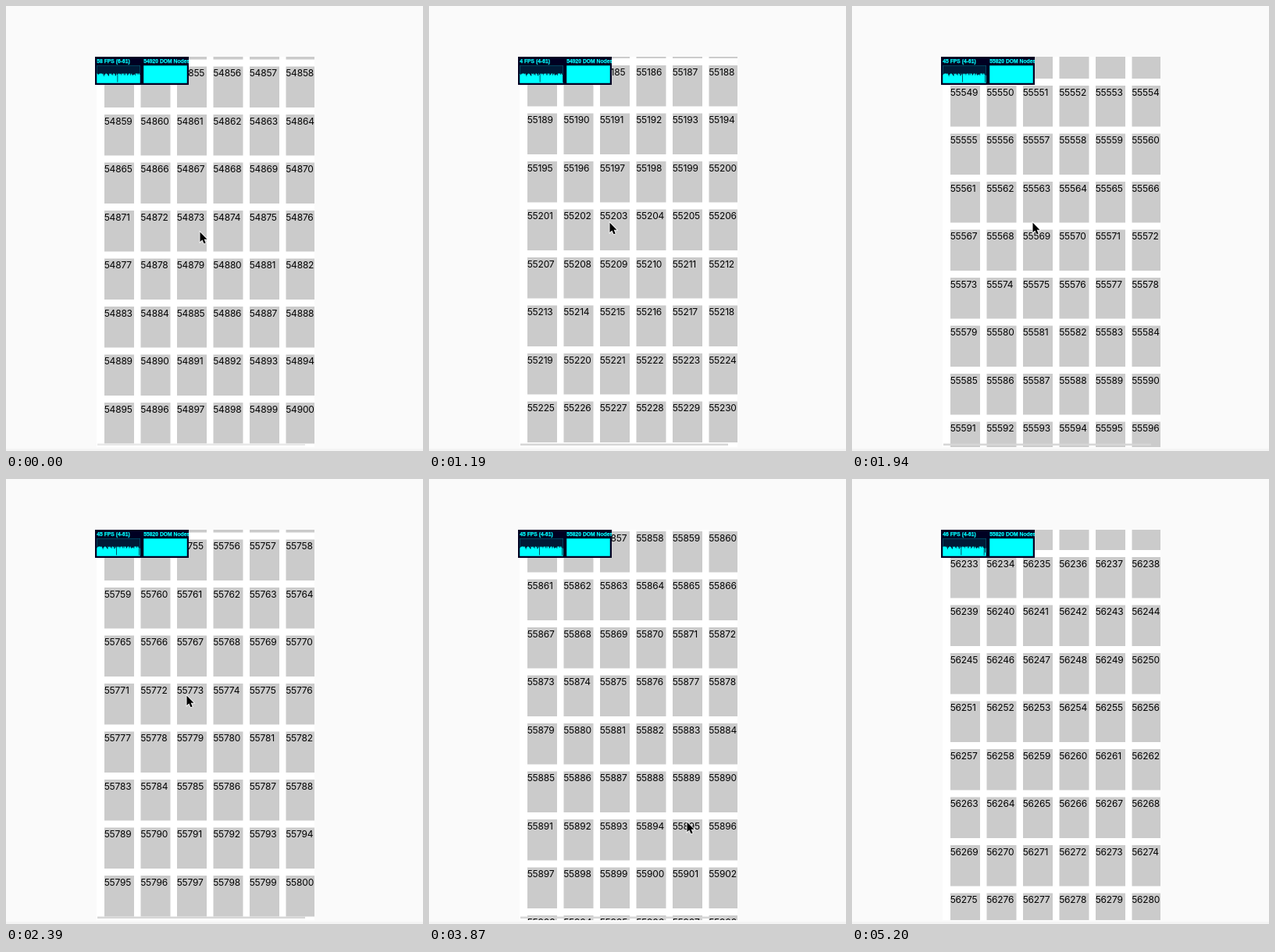
Write an HTML page with a canvas that moves like this. It is 534 px wide and 570 px high and loops after 5.64 s.

```html
<!DOCTYPE html>
<html lang="en">
<head>
<meta charset="utf-8">
<title>Endless grid</title>
<style>
html, body { margin: 0; width: 100%; height: 100%; overflow: hidden; background: #fafafa; }
canvas { display: block; width: 534px; height: 570px; }
</style>
</head>
<body>
<canvas id="stage"></canvas>
<script>
const LOOP = 5640, STEP = 148.5;          // ms; the picture refreshes once per step
const PITCH = 61.5, COLS = 6, FIRST_ROW = 9142;
const canvas = document.getElementById('stage');
const ctx = canvas.getContext('2d');
const dpr = window.devicePixelRatio || 1;
canvas.width = 534 * dpr;
canvas.height = 570 * dpr;
ctx.scale(dpr, dpr);

// Moves: first step, last step, distance
const scrolling = [[3.7, 6, 1840.5], [6, 11, 3858.5], [11, 16, 3526], [24, 29, 2639.5], [29, 35, 2258]];
const pointerX = [[3, 5, -17], [17, 20, 94], [24, 26, 5], [32, 35, 135]];
const pointerY = [[3, 5, -12], [17, 20, 155], [24, 26, 7], [32, 35, 100]];
const stalls = [10, 15, 27];              // steps where the page hangs

const ramp = (k, a, b) => Math.min(1, Math.max(0, (k - a) / (b - a)));
const travel = (moves, k) => moves.reduce((sum, [a, b, d]) => sum + d * ramp(k, a, b), 0);

function rect(color, x, y, w, h) {
  ctx.fillStyle = color;
  ctx.fillRect(x, y, w, h);
}

function clipped(x, y, w, h, draw) {
  ctx.save();
  ctx.beginPath();
  ctx.rect(x, y, w, h);
  ctx.clip();
  draw();
  ctx.restore();
}

function noise(n) {
  const s = Math.sin(n * 127.1 + 3.7) * 43758.5453;
  return s - Math.floor(s);
}

// Frame rates so far: steady, with one deep dip
const rates = Array.from({ length: 74 }, (_, i) => i === 35 ? 6 : 55 - 16 * noise(i) ** 3);

function drawGrid(offset) {
  rect('#fff', 116, 65, 279, 500);
  ctx.font = '12px Inter, sans-serif';
  ctx.letterSpacing = '-0.2px';
  const first = Math.floor(offset / PITCH) - 1;
  for (let r = first; r < first + 10; r++) {
    const y = Math.round((77.5 + r * PITCH - offset) * 2) / 2;
    for (let c = 0; c < COLS; c++) {
      const x = 126 + c * 46.5;
      rect('#cbcbcb', x, y, 38, 52.5);
      ctx.fillStyle = '#000';
      ctx.fillText((FIRST_ROW + r) * COLS + c + 1, x - .3, Math.floor(y + 13));
    }
  }
}

function drawPanel(x, label, values) {
  clipped(x, 65, 60, 36, () => {
    rect('#002', x, 65, 60, 36);
    ctx.font = 'bold 6.75px "Liberation Sans", Arial, sans-serif';
    ctx.letterSpacing = '0px';
    ctx.fillStyle = ctx.strokeStyle = '#0ff';
    ctx.lineWidth = .25;
    ctx.fillText(label, x + 2.25, 73);
    ctx.strokeText(label, x + 2.25, 73);
    rect('#0ff', x + 2.25, 76.25, 55.5, 22.5);
    ctx.beginPath();
    values.forEach((v, i) => ctx.rect(x + 2.25 + i * .75, 76.25, .75, 22.5 * (1 - v / 100)));
    ctx.fillStyle = '#001a36';
    ctx.fill();
  });
}

function drawStats(k) {
  const shown = [4, 45, 20, 46].slice(0, (k >= 4) + (k >= 12) + (k >= 28) + (k >= 33));
  const fps = shown.length ? shown[shown.length - 1] : 58;
  drawPanel(114, `${fps} FPS (${Math.min(6, ...shown)}-61)`, [...rates, ...shown].slice(-74));
  drawPanel(174, `${k < 11 ? 54920 : 55820} DOM Nodes`, []);
}

const arrow = new Path2D('M0 0V12.6L2.9 10L5 14.8L7.2 13.9L5.2 9.2H9Z');

function drawPointer(x, y) {
  ctx.save();
  ctx.translate(x, y);
  ctx.lineWidth = 1.6;
  ctx.strokeStyle = '#fff';
  ctx.stroke(arrow);
  ctx.fillStyle = '#000';
  ctx.fill(arrow);
  ctx.restore();
}

function render(k) {
  const page = stalls.includes(k) ? k - 1 : k;
  rect('#fafafa', 0, 0, 534, 570);
  rect('#f4f4f4', 0, 567, 534, 3);
  clipped(116, 65, 279, 500, () => drawGrid(travel(scrolling, page)));
  if (k < 18 || (k >= 25 && k < 35)) rect(k < 4 ? '#e8e8e8' : '#d6d6d6', 117, 560.5, 266, 2.5);
  drawStats(page);
  if (k < 35) drawPointer(248.5 + travel(pointerX, page), 289.5 + travel(pointerY, page));
}

const start = performance.now();
function frame() {
  const t = (performance.now() - start) % LOOP;
  render(Math.max(0, Math.floor((t - 2) / STEP)));
  requestAnimationFrame(frame);
}
frame();
</script>
</body>
</html>
```
